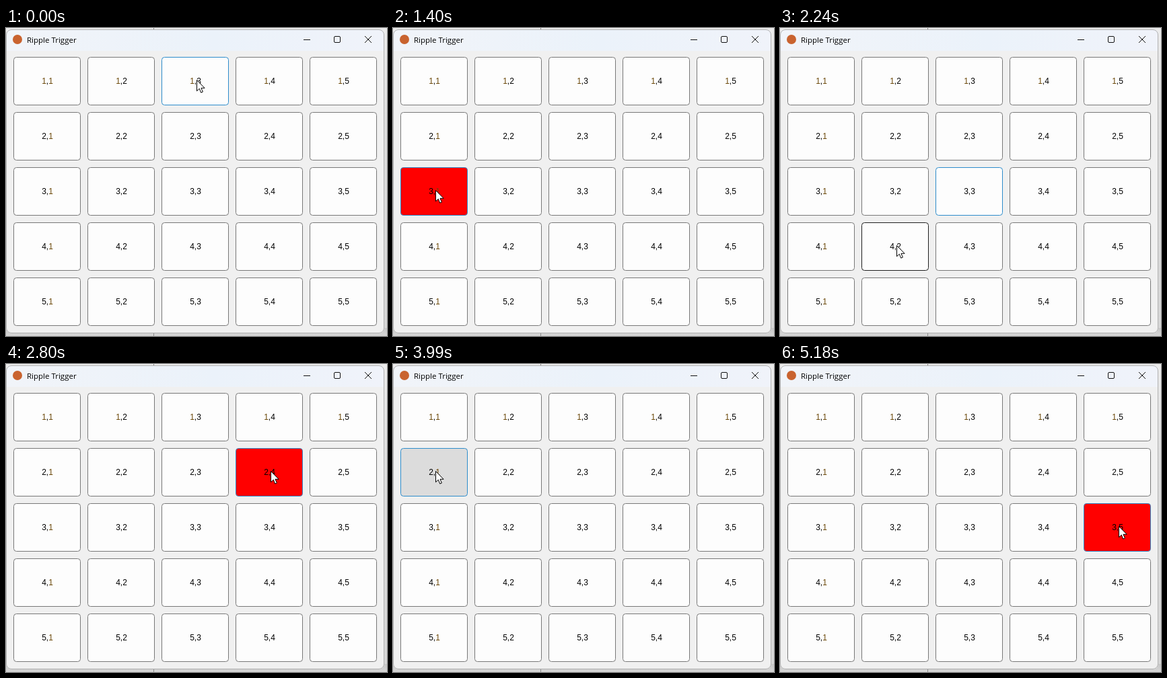
These frames come from a looping animation (566x458 px, 5250 ms). An HTML page:

```html
<!DOCTYPE html>
<html lang="en">
<head>
<meta charset="utf-8">
<title>Ripple Trigger</title>
<style>
  html, body { margin: 0; width: 100%; height: 100%; overflow: hidden; }
  svg { display: block; width: 566px; height: 458px; }
  .title { font: 11.5px "Open Sans", "Noto Sans", sans-serif; }
  .label { font: 12px "Liberation Sans", Arial, sans-serif; text-anchor: middle; }
  .glyph { fill: none; stroke: #111; }
</style>
</head>
<body>
<svg viewBox="0 0 566 458">
  <defs>
    <linearGradient id="bar">
      <stop offset="0" stop-color="#f1f4f9"/>
      <stop offset=".55" stop-color="#ebf2fa"/>
      <stop offset="1" stop-color="#f0f3fa"/>
    </linearGradient>
    <linearGradient id="below" x2="0" y2="1">
      <stop offset="0" stop-color="#c6c6c6"/>
      <stop offset="1" stop-color="#d6d6d6"/>
    </linearGradient>
    <linearGradient id="side" x2="0" y2="1">
      <stop offset="0" stop-color="#ececec"/>
      <stop offset=".3" stop-color="#dedede"/>
      <stop offset="1" stop-color="#d6d6d6"/>
    </linearGradient>
    <clipPath id="frame"><rect x="0" y="2" width="562" height="452" rx="8"/></clipPath>
  </defs>

  <rect width="566" height="458" fill="url(#side)"/>
  <rect y="446" width="566" height="12" fill="url(#below)"/>
  <path d="M219.5 0V458" stroke="#8c8c8c"/>
  <g clip-path="url(#frame)">
    <rect width="562" height="454" fill="#f0f0f0"/>
    <rect width="562" height="34" fill="url(#bar)"/>
  </g>
  <rect x=".5" y="2.5" width="561" height="451" rx="7.5" fill="none" stroke="#b0b0b0"/>

  <circle cx="17" cy="17" r="7" fill="#c9632f"/>
  <text class="title" x="31" y="22">Ripple Trigger</text>
  <path class="glyph" d="M442 17.5h10"/>
  <rect class="glyph" x="487.5" y="12.5" width="9" height="9" rx="1.5"/>
  <path class="glyph" d="M533 12l10 10m0-10l-10 10"/>

  <g id="grid"></g>
  <path id="cursor" d="M0 0V16.2L3.8 12.7L6.2 18.6L8.9 17.5L6.5 11.8H11.6Z" fill="#fff" stroke="#000"/>
</svg>
<script>
const STEP = 70, STEPS = 75, STEPS_PER_CLICK = 4.8;
const SIZE = 5, PITCH_X = 110, PITCH_Y = 82;

// Row and column of every button clicked, in order.
const clicks = "13 54 25 34 31 52 33 42 24 53 22 44 21 55 14 35".split(" ");
const colors = {
  idle: "#787878", hover: "#202020", focus: "#2d8ccb",
  face: "#fdfdfd", pressed: "#dcdcdc", active: "#ff0000"
};

const grid = document.getElementById("grid");
const cursor = document.getElementById("cursor");
const buttons = {};

function add(parent, tag, attributes, text = "") {
  const node = document.createElementNS("http://www.w3.org/2000/svg", tag);
  for (const key in attributes) node.setAttribute(key, attributes[key]);
  node.textContent = text;
  return parent.appendChild(node);
}

function addButton(row, col) {
  const x = 11.5 + (col - 1) * PITCH_X, y = 43.5 + (row - 1) * PITCH_Y;
  buttons[`${row}${col}`] = add(grid, "rect", { x, y, width: 99, height: 71, rx: 4 });
  const label = add(grid, "text", { class: "label", x: x + 50, y: y + 39.5 });
  for (const char of `${row},${col}`) {
    add(label, "tspan", { fill: char === "1" ? "#6a4708" : "#000" }, char);
  }
}

for (let row = 1; row <= SIZE; row++) {
  for (let col = 1; col <= SIZE; col++) addButton(row, col);
}

function paint(key, face, border) {
  buttons[key].setAttribute("fill", face);
  buttons[key].setAttribute("stroke", border);
}

function render(time) {
  const step = Math.floor(time / STEP) % STEPS;
  const progress = step / STEPS_PER_CLICK + 0.4;
  const index = Math.floor(progress), phase = progress - index;
  const current = clicks[index];
  const previous = clicks[(index + clicks.length - 1) % clicks.length];

  for (const key in buttons) paint(key, colors.face, colors.idle);

  // Hover, press, release, light up, go dark.
  if (phase < 0.15) {
    paint(previous, colors.face, colors.focus);
    paint(current, colors.face, colors.hover);
  } else {
    const face = phase < 0.34 ? colors.pressed
      : phase >= 0.5 && phase < 0.95 ? colors.active
      : colors.face;
    paint(current, face, colors.focus);
  }

  const x = 283.5 + (current[1] - 3) * PITCH_X;
  const y = 77.5 + (current[0] - 1) * PITCH_Y;
  cursor.setAttribute("transform", `translate(${x} ${y})`);
}

const start = performance.now();
function tick() {
  render(performance.now() - start);
  requestAnimationFrame(tick);
}
tick();
</script>
</body>
</html>
```
